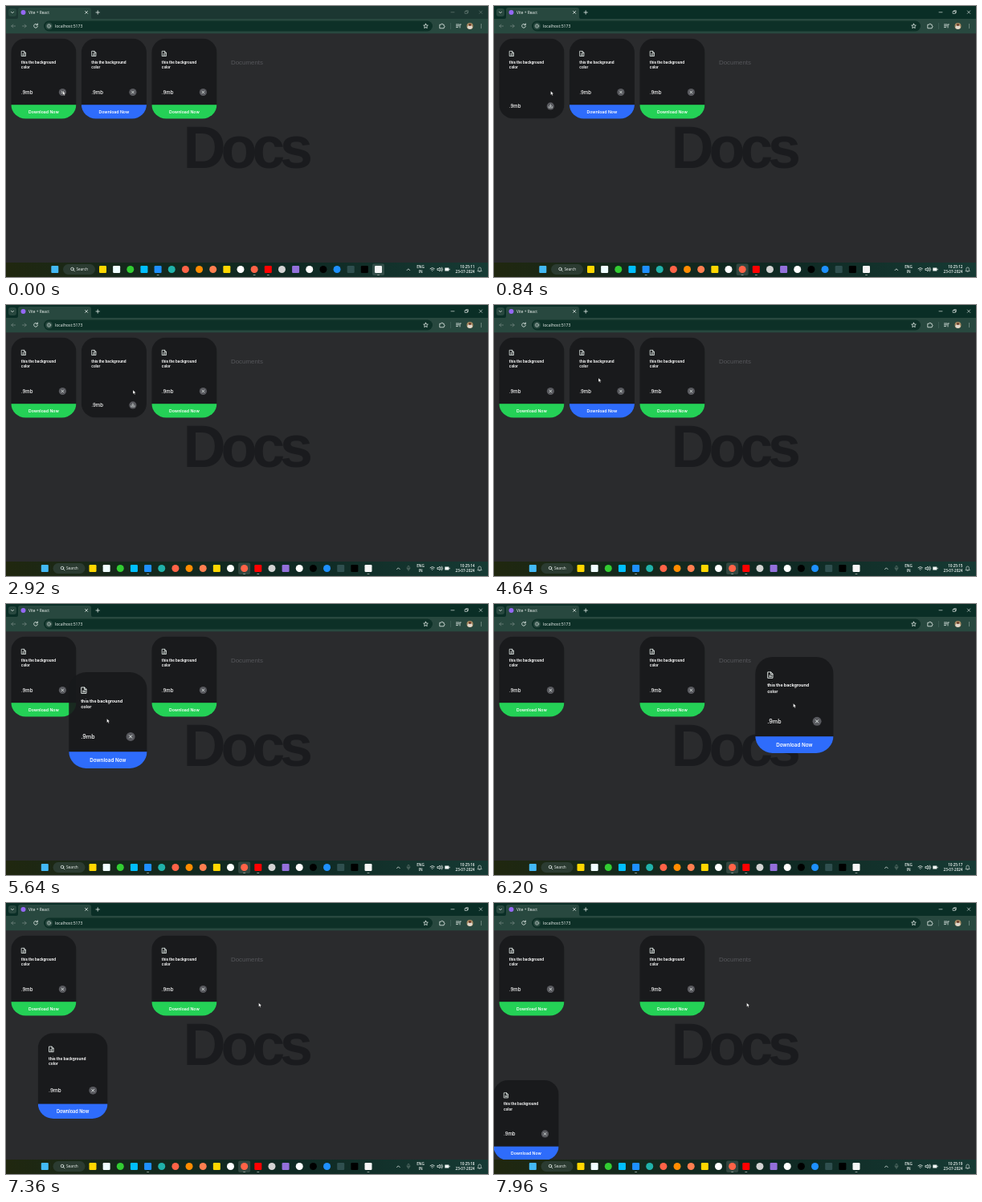
An HTML page for the animation above (8000 ms loop, 600 by 338 pixels).

```html
<!DOCTYPE html>
<html lang="en">
<head>
<meta charset="utf-8">
<title>Docs</title>
<style>
  html, body { margin: 0; width: 100%; height: 100%; overflow: hidden; background: #2a2b2d; }
  svg { display: block; width: 100vw; height: 100vh; }
  text { font-family: "Open Sans", "Noto Sans", sans-serif; font-weight: 500; fill: #f2f7f5; }
  .page text { font-family: Inter, "Liberation Sans", sans-serif; fill: #fff; }
  .page .big, .page .label { font-family: "Liberation Sans", Arial, sans-serif; }
  .page .big { font-size: 73.5px; font-weight: 700; letter-spacing: -6.1px; fill: #1a1b1e; }
  .page .label { font-size: 7.9px; font-weight: 400; fill: #55565a; }
  .name { font-size: 4.45px; font-weight: 700; }
  .size { font-size: 6px; }
  .now { font-size: 5.2px; font-weight: 600; text-anchor: middle; }
  .tray { font-size: 4.6px; }
  .tray text { font-weight: 600; }
  .line { fill: none; stroke: #e4ece9; stroke-width: .8; stroke-linecap: round; stroke-linejoin: round; }
  .thin { stroke-width: .6; }
  .dim { stroke: #71857e; }
</style>
</head>
<body>
<svg viewBox="0 0 600 338" xmlns="http://www.w3.org/2000/svg">
  <defs>
    <clipPath id="view"><rect y="34" width="600" height="286"/></clipPath>
    <clipPath id="round"><rect width="81.25" height="100" rx="18"/></clipPath>
    <linearGradient id="bar">
      <stop offset="0" stop-color="#20270f"/>
      <stop offset=".25" stop-color="#15281c"/>
      <stop offset=".6" stop-color="#0f2923"/>
      <stop offset="1" stop-color="#163a34"/>
    </linearGradient>
  </defs>

  <g class="page" clip-path="url(#view)">
    <rect y="34" width="600" height="286" fill="#2a2b2d"/>
    <text class="label" x="280" y="72.5">Documents</text>
    <text class="big" x="220.5" y="202">Docs</text>
    <g id="cards"></g>
  </g>

  <g id="browser">
    <rect id="strip" width="600" height="17"/>
    <rect y="16" width="600" height="18.3" fill="#28483f"/>
    <path d="M13 16q2 0 2-2V5q0-3 3-3h85q3 0 3 3v9q0 2 2 2z" fill="#28483f"/>
    <rect x="3" y="3" width="10" height="10" rx="3" fill="#28483f"/>
    <path class="line" d="M6.5 7.3l1.5 1.5 1.5-1.5"/>
    <circle cx="21.5" cy="8" r="3" fill="#9468f5"/>
    <text x="28" y="10" font-size="4.8">Vite + React</text>
    <path class="line" d="M98.6 6.4l3 3m0-3l-3 3M112 8h4.4m-2.2-2.2v4.4"/>
    <path id="controls" class="line thin" d="M554 7.8h4M571.5 6.6h2.8v2.8h-2.8zM572.6 6.6v-.9h2.7v2.7h-.9M589.3 6l3.4 3.4m0-3.4l-3.4 3.4"/>
    <path class="line dim" d="M11.5 25H6.8m2-2l-2 2 2 2M20.5 25h4.7m-2-2l2 2-2 2"/>
    <path class="line" d="M39 23.4a2.4 2.4 0 1 0 .4 2M39.4 22v1.8h-1.8"/>
    <rect x="47" y="18.5" width="484" height="13" rx="6.5" fill="#0d3027"/>
    <circle cx="53.5" cy="25" r="4.6" fill="#28483f"/>
    <circle class="line thin" cx="53.5" cy="25" r="2.2"/>
    <path class="line thin" d="M53.5 24.8v1.1M53.5 23.8v.1"/>
    <text x="61" y="26.9" font-size="5.1">localhost:5173</text>
    <path class="line" d="M522.5 22.2l.8 1.8 2 .2-1.5 1.4.4 2-1.7-1-1.7 1 .4-2-1.5-1.4 2-.2z"/>
    <path class="line" d="M540.2 23.2h1.6a1 1 0 0 1 2 0h1.3v1.5a1 1 0 0 1 0 2v1.1h-4.9z"/>
    <path d="M553.5 21v8" stroke="#4a6a60" stroke-width=".6"/>
    <path class="line" d="M560.5 23h3.6m-3.6 1.8h3m-3 1.8h2M565 27v-4h1.4"/>
    <circle cx="577.5" cy="25" r="4" fill="#a58a62"/>
    <path d="M574.3 27.3a3.2 3.2 0 0 1 6.4 0 4 4 0 0 1-6.4 0z" fill="#e0d8cc"/>
    <circle cx="577.5" cy="23.6" r="1.5" fill="#6b3a28"/>
    <path class="line" d="M591.5 23v.1m0 1.9v.1m0 1.9v.1"/>
  </g>

  <g id="taskbar">
    <rect y="320" width="600" height="18" fill="url(#bar)"/>
    <g id="icons"></g>
    <path id="chevron" class="line" d="M486.6 329.6l1.8-1.8 1.8 1.8"/>
    <path id="mic" class="line thin dim" d="M500 326.3a1 1 0 0 1 2 0v1.7a1 1 0 0 1-2 0zM499 328a2 2 0 0 0 4 0M501 330v1.4"/>
    <g class="tray">
      <g text-anchor="middle"><text x="516" y="327">ENG</text><text x="516" y="333.4">IN</text></g>
      <g text-anchor="end"><text id="clock" x="583.5" y="327"></text><text x="583.5" y="333.4">23-07-2024</text></g>
    </g>
    <path class="line" d="M528 327.6a4 4 0 0 1 5.4 0M529.2 329a2.3 2.3 0 0 1 3 0M530.7 330.4v.1"/>
    <path class="line" d="M537.3 327.5h1.2l1.5-1.4v4.8l-1.5-1.4h-1.2zM541.4 327a2 2 0 0 1 0 3M542.6 326a3.6 3.6 0 0 1 0 5"/>
    <path d="M546.3 326.5h5v4h-5zM551.6 327.7h.9v1.6h-.9z" fill="#f2f7f5"/>
    <path class="line thin" d="M587.2 330.3l.7-1v-1.6a1.7 1.7 0 0 1 3.4 0v1.6l.7 1zM589 331.3h1.1"/>
  </g>

  <path id="cursor" d="M0 0v5l1.2-1 .8 1.8.9-.4-.8-1.8h1.6z" fill="#fff" stroke="#111" stroke-width=".35"/>
</svg>

<script>
const LOOP = 8000, CARD_W = 81.25, CARD_H = 100, PITCH = 87.5;
const $ = id => document.getElementById(id);
const home = i => [46.9 + PITCH * i, 90.5];

const card = color => `<g class="card">
  <g clip-path="url(#round)">
    <rect width="${CARD_W}" height="${CARD_H}" fill="#18191b" opacity=".9"/>
    <g class="tag">
      <rect y="82.7" width="${CARD_W}" height="18" fill="${color}"/>
      <text class="now" x="40.6" y="93.2">Download Now</text>
    </g>
  </g>
  <path class="line" d="M13.3 15.8h3l1.9 1.9v4.3h-4.9zM16.1 15.9v2h2M14.6 19.3h2.3m-2.3 1.3h2.3"/>
  <text class="name" x="12.5" y="31.3">this the background</text>
  <text class="name" x="12.5" y="37.6">color</text>
  <g class="foot">
    <text class="size" x="12.5" y="69.3">.9mb</text>
    <circle cx="64.1" cy="67" r="4.6" fill="#58595e"/>
    <path class="line cross" d="M62.7 65.6l2.8 2.8m0-2.8l-2.8 2.8"/>
    <path class="line thin arrow" d="M64.1 64.8v2.8m-1.1-1.1l1.1 1.1 1.1-1.1M62 67.6v1.4h4.2v-1.4"/>
  </g>
</g>`;
$('cards').innerHTML = ['#24d156', '#2e6cfb', '#24d156'].map(card).join('');
const cards = [...document.querySelectorAll('.card')];

// Taskbar apps, evenly spaced; a leading "o" makes a round icon
const apps = ('gold azure olimegreen deepskyblue dodgerblue olightseagreen otomato odarkorange ocoral gold ' +
  'owhite otomato red olightgray mediumpurple owhite oblack ododgerblue darkslategray black whitesmoke').split(' ');
const appX = i => 108 + i * 17.15;
const CHROME = 11, RECORDER = 20, running = [4, CHROME, CHROME + 1, RECORDER];
const icon = (x, color, rx) =>
  `<rect x="${x - 4.5}" y="324" width="9" height="9" rx="${rx}" fill="${color}"/>`;
const app = (name, i) => name[0] === 'o' ? icon(appX(i), name.slice(1), 4.5) : icon(appX(i), name, 1.2);

$('icons').innerHTML =
  `<rect id="active" y="321.5" width="15" height="14.5" rx="2" fill="#fff" opacity=".14"/>
   ${icon(48.3, '#43b9f5', 1)}
   <rect x="58.5" y="322" width="40" height="13" rx="6.5" fill="#2b3b31"/>
   <circle class="line" cx="70" cy="328" r="1.8"/><path class="line" d="M71.4 329.4l1.5 1.5"/>
   <text x="75" y="330.4" font-size="4.7">Search</text>` +
  apps.map(app).join('') +
  running.map(i => `<rect x="${appX(i) - 1.5}" y="335" width="3" height="1" rx=".5" fill="#8d9a94"/>`).join('');

const ease = (t, from, to) => {
  const u = Math.min(1, Math.max(0, (t - from) / (to - from)));
  return u * u * (3 - 2 * u);
};
const mix = (a, b, u) => a.map((v, i) => v + (b[i] - v) * u);
const add = (a, b) => a.map((v, i) => v + b[i]);
const during = (t, from, to) => t >= from && t < to;
const button = (i, closed) => [70.5 + PITCH * i, closed ? 123.5 : 106];

// Pointer glides: start, end, destination
const glides = [
  [880, 1480, button(0, true)],
  [1840, 2240, button(1, false)],
  [3400, 3480, button(1, true)],
  [3840, 4560, [130, 91]],
  [4640, 4840, [133, 88.5]],
  [5000, 5640, [125.5, 143]],
  [5660, 6640, [553, 110]],
  [6680, 6900, [525.5, 95.5]],
  [6940, 7320, [314.5, 124.5]]
];
const pointer = t => glides.reduce((p, [from, to, spot]) => mix(p, spot, ease(t, from, to)), button(0, false));

// The blue card is dragged twice: dropped at the right edge, then thrown to the lower left corner
const DRAG = 5000, DROP = 6660, GRAB = 6920, THROW = 7240;
const RIGHT = [551, 91], CORNER = [40, 270.2];
const firstHold = t => add(pointer(t), [1.4, 2]);
const secondHold = t => add(pointer(t), [25.5, -4.5]);

function dragged(t) {
  if (t < DRAG) return home(1);
  if (t < DROP) return firstHold(t);
  if (t < GRAB) return mix(firstHold(DROP), RIGHT, ease(t, DROP, 6880));
  if (t < THROW) return secondHold(t);
  const [x, y] = secondHold(THROW), d = t - THROW;
  return [
    CORNER[0] + (x - CORNER[0]) * Math.exp(-d / 60),
    CORNER[1] + (y - CORNER[1]) * Math.exp(-d / 160) * Math.cos(d / 170)
  ];
}
const lift = t => 1 + .2 * (ease(t, DRAG, DRAG + 250) - ease(t, DROP, DROP + 220)
  + ease(t, GRAB, GRAB + 200) - ease(t, THROW, THROW + 200));

const show = (el, on) => el.setAttribute('visibility', on ? 'visible' : 'hidden');
const move = (el, [x, y], s = 1) => el.setAttribute('transform', `translate(${x} ${y}) scale(${s})`);

function placeCard(i, [x, y], scale, closed) {
  const el = cards[i];
  move(el, [x - CARD_W * scale / 2, y - CARD_H * scale / 2], scale);
  show(el.querySelector('.tag'), !closed);
  show(el.querySelector('.cross'), !closed);
  show(el.querySelector('.arrow'), closed);
  move(el.querySelector('.foot'), [0, closed ? 17.4 : 0]);
}

function draw(t) {
  placeCard(0, home(0), 1, during(t, 160, 1840));
  placeCard(1, dragged(t), lift(t), during(t, 2920, 3800));
  placeCard(2, home(2), 1, false);
  move($('cursor'), pointer(t));

  const focused = t >= 60;
  $('strip').setAttribute('fill', focused ? '#0a2e26' : '#1c3732');
  $('controls').style.stroke = focused ? '#f2f7f5' : '#71857e';
  $('active').setAttribute('x', appX(focused ? CHROME : RECORDER) - 7.5);

  // The tray makes room for the microphone
  const room = ease(t, 1000, 1300), shift = [12.5 * (1 - room), 0];
  move($('icons'), shift);
  move($('chevron'), shift);
  $('mic').setAttribute('opacity', room);
  $('clock').textContent = '10:25:' + (11 + Math.floor((t + 160) / 1000));
}

function frame(now) {
  draw(now % LOOP);
  requestAnimationFrame(frame);
}
draw(0);
requestAnimationFrame(frame);
</script>
</body>
</html>
```
